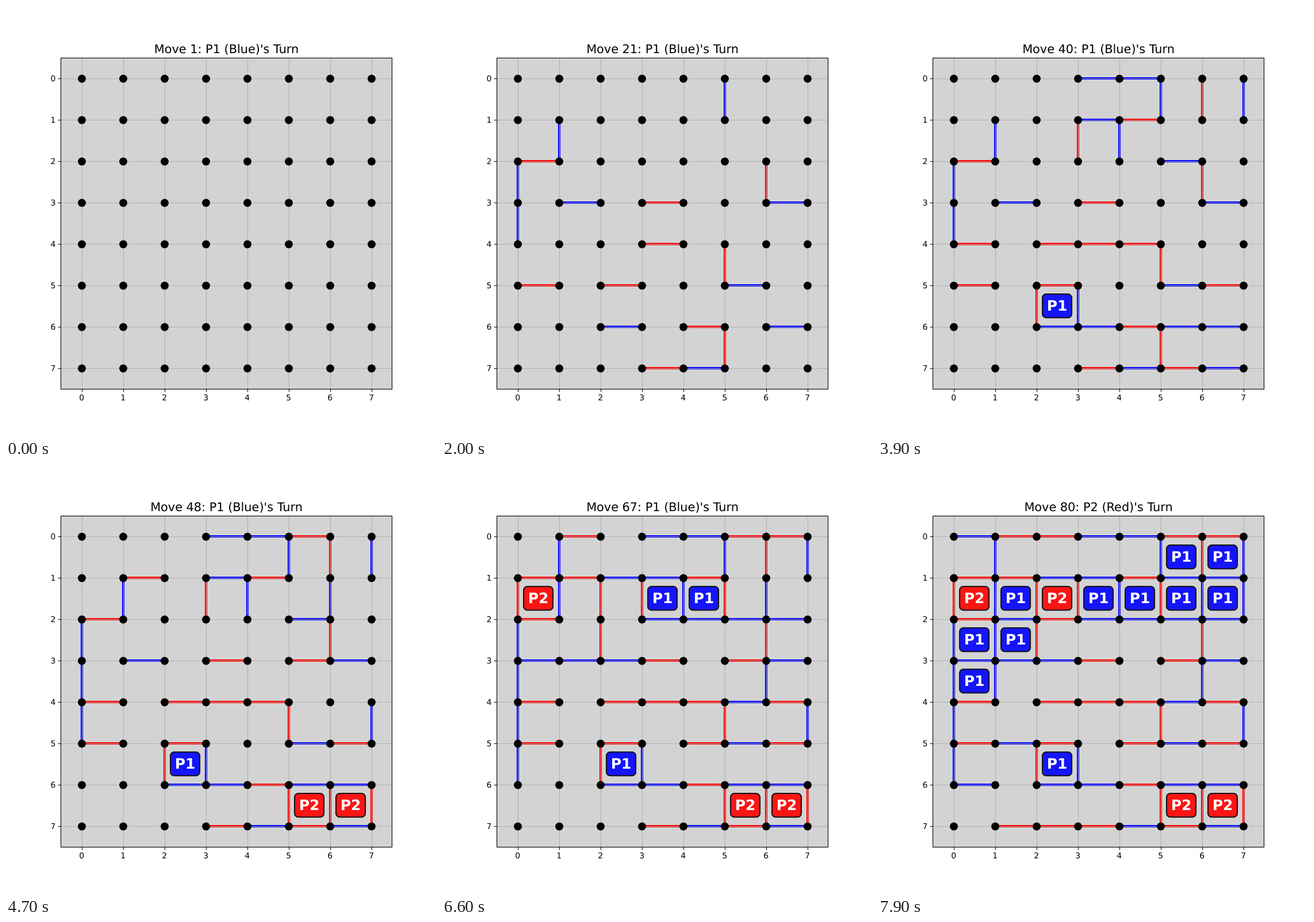
An HTML page that plays this animation: 748 px wide and 748 px high, repeating every 8000 ms.

```html
<!DOCTYPE html>
<html lang="en">
<head>
<meta charset="utf-8">
<title>Dots and Boxes</title>
<style>
  html, body { margin: 0; width: 100%; height: 100%; overflow: hidden; background: #fff; }
  svg { display: block; width: 748px; height: 748px; font-family: "DejaVu Sans", sans-serif; text-rendering: geometricPrecision; }
  .p1 { --ink: #00f; --fill: #1515fb; }
  .p2 { --ink: #f00; --fill: #fb1515; }
  .edge { stroke: var(--ink); stroke-width: 4.17; }
  .grid { stroke: #b0b0b0; stroke-width: 1.1; }
  .axis { stroke: #000; stroke-width: 1.1; fill: none; }
  .tick { font-size: 13.89px; }
  .title { font-size: 20.83px; text-anchor: middle; }
  .badge rect { fill: var(--fill); stroke: #151515; stroke-width: 2.1; }
  .badge text { fill: #fff; font-size: 25px; font-weight: bold; text-anchor: middle; }
  .mid { text-anchor: middle; }
  .end { text-anchor: end; }
</style>
</head>
<body>
<svg id="board" viewBox="0 0 748 748"></svg>
<script>
const STEP = 100, SIZE = 8;
// H or V, then row and column of the segment's first dot
const moves = `
  V30 H73 H36 V26 H62 V45 H31 H52 H55 H20
  V05 H33 V20 H50 H74 V65 V11 H43 H66 H64
  H03 V06 H13 H44 H76 H14 H25 H75 V07 H40
  H65 V13 V14 H56 H04 H42 H63 V52 V53
  V47 H35 V40 H05 V16 V66 V67 H11 H45 V10
  V50 H10 H01 V36 V15 H12 H06
  H26 H54 H24 H23 H32 H46 H30 V12 V01 V22
  H15 V21 V17 H71 H16 V31 H21 H51 H22 H72
  H00 H02 H60`.trim().split(/\s+/);

const board = document.getElementById("board");
const px = col => 132 + 72 * col;
const py = row => 126 + 72 * row;

function add(parent, tag, attrs, text) {
  const el = document.createElementNS("http://www.w3.org/2000/svg", tag);
  for (const key in attrs) el.setAttribute(key, attrs[key]);
  if (text !== undefined) el.textContent = text;
  return parent.appendChild(el);
}
const line = (parent, cls, x1, y1, x2, y2) =>
  add(parent, "line", { class: cls, x1, y1, x2, y2 });

add(board, "rect", { x: 95.5, y: 90.5, width: 576, height: 576, fill: "#d3d3d3" });
const edges = add(board, "g", {});
for (let i = 0; i < SIZE; i++) {
  const x = px(i) + 0.5, y = py(i) + 0.5;
  line(board, "grid", x, 90.5, x, 666.5);
  line(board, "grid", 95.5, y, 671.5, y);
  line(board, "axis", x, 666.5, x, 671.4);
  line(board, "axis", 90.6, y, 95.5, y);
  add(board, "text", { class: "tick mid", x: px(i) - 0.3, y: 686 }, i);
  add(board, "text", { class: "tick end", x: 86.3, y: py(i) + 5 }, i);
}
add(board, "rect", { class: "axis", x: 95.5, y: 90.5, width: 576, height: 576 });
for (let n = 0; n < SIZE * SIZE; n++)
  add(board, "circle", { cx: px(n % SIZE), cy: py(Math.floor(n / SIZE)) + 0.5, r: 6.94 });
const badges = add(board, "g", {});
const title = add(board, "text", { class: "title", x: 383.5, y: 82 });

function addBadge(row, col, player) {
  const x = px(col) + 35.5, y = py(row) + 35.6;
  const g = add(badges, "g", { class: `badge p${player}` });
  add(g, "rect", { x: x - 25.5, y: y - 20.6, width: 51, height: 41.2, rx: 6.5 });
  add(g, "text", { x, y: y + 8.2 }, "P" + player);
  return g;
}

// Play the game once: closing a box earns another turn.
const drawn = new Set();
const isClosed = (r, c) =>
  ["H" + r + c, "H" + (r + 1) + c, "V" + r + c, "V" + r + (c + 1)].every(e => drawn.has(e));
const turns = [1];
const parts = [];
let player = 1;
moves.forEach((move, i) => {
  const flat = move[0] === "H", r = +move[1], c = +move[2];
  const show = el => parts.push({ el, from: i + 1 });
  show(line(edges, `edge p${player}`, px(c), py(r), px(c + flat), py(r + !flat)));
  drawn.add(move);
  const won = [[r, c], flat ? [r - 1, c] : [r, c - 1]].filter(b => isClosed(...b));
  won.forEach(b => show(addBadge(...b, player)));
  if (!won.length) player = 3 - player;
  turns.push(player);
});

let shown = -1;
function draw() {
  const step = Math.floor(performance.now() / STEP) % turns.length;
  if (step !== shown) {
    shown = step;
    for (const { el, from } of parts) el.style.display = step >= from ? "" : "none";
    const name = turns[step] === 1 ? "P1 (Blue)" : "P2 (Red)";
    title.textContent = `Move ${step + 1}: ${name}'s Turn`;
  }
  requestAnimationFrame(draw);
}
draw();
</script>
</body>
</html>
```
